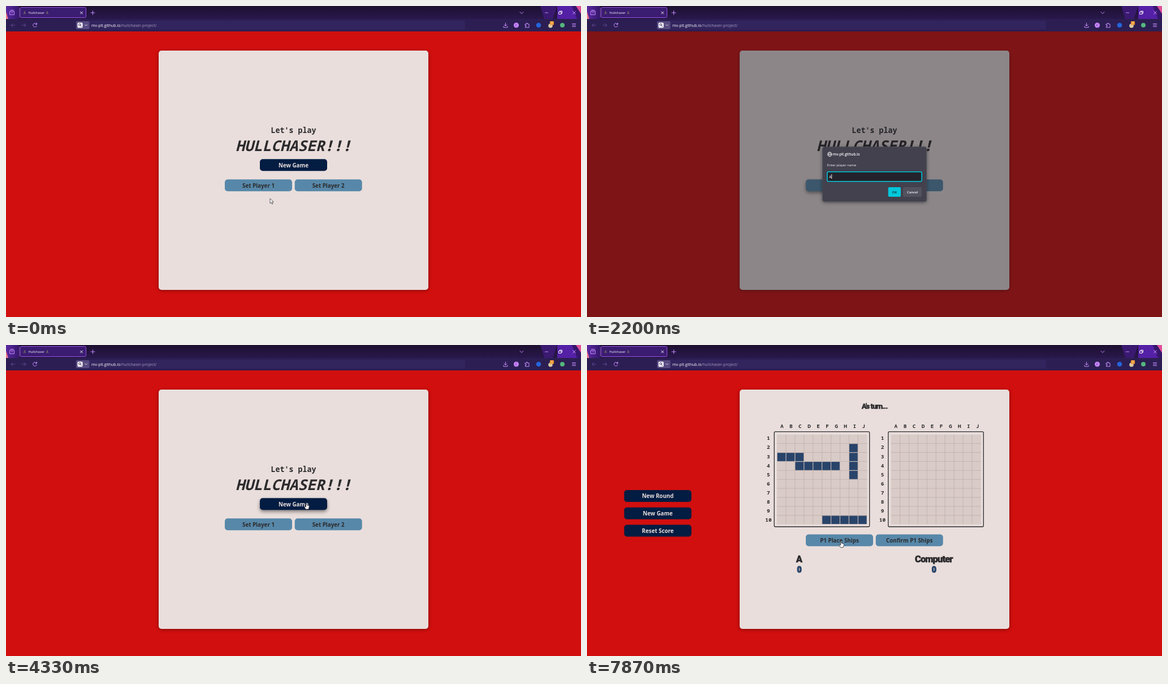
These frames come from a looping animation (1017 px wide and 551 px high, 8 s). An HTML page:

```html
<!DOCTYPE html>
<html lang="en">
<head>
<meta charset="utf-8">
<title>Hullchaser</title>
<style>
  html, body { margin: 0; width: 100%; height: 100%; overflow: hidden; background: #d10f0e; }
  svg { display: block; width: 100vw; height: 100vh; }
  text { font-family: 'Open Sans', 'Noto Sans', sans-serif; fill: #fbfbfe; white-space: pre; }
  .mid { text-anchor: middle; }
  .mono { font-family: 'Noto Sans Mono', 'DejaVu Sans Mono', monospace; font-weight: 700; fill: #2b2a2c; }
  .heavy { font-family: Impact, Roboto, sans-serif; font-weight: 900; fill: #2b2a2c; letter-spacing: -.9px; }
  .label { font: 700 9.8px 'Noto Sans', sans-serif; text-anchor: middle; }
  .line { fill: none; stroke: #c58cff; stroke-width: 1; stroke-linecap: round; stroke-linejoin: round; }
</style>
</head>
<body>
<svg id="stage" viewBox="0 0 1017 551" preserveAspectRatio="none"></svg>
<script>
const rect = (x, y, w, h, fill, r = 0, more = '') =>
  `<rect x="${x}" y="${y}" width="${w}" height="${h}" rx="${r}" fill="${fill}" ${more}/>`;
const text = (x, y, size, str, cls = '', more = '') =>
  `<text x="${x}" y="${y}" class="${cls}" style="font-size:${size}px;${more}">${str}</text>`;
const line = (d, more = '') => `<path class="line" d="${d}" ${more}/>`;
const group = (id, body) => `<g id="${id}">${body}</g>`;

function button(x, y, label, navy, id) {
  const shadow = id ? rect(x, y + 3, 119, 21, '#000', 5, `id="${id}" filter="url(#soft)"`) : '';
  return shadow + rect(x, y, 119, 21, navy ? '#031c42' : '#5788a9', 5) +
    `<text class="label" x="${x + 59.5}" y="${y + 14.2}" style="fill:${navy ? '#e9dedc' : '#2b2a2c'}">${label}</text>`;
}

function board(x) {
  let out = rect(x, 153.7, 168.5, 168.3, 'none', 2, 'stroke="#2b2a2c" stroke-width="1.3"') +
    rect(x + 4.8, 158.6, 159.4, 159.2, '#d9cbc7');
  let grid = '';
  for (let i = 0; i < 10; i++) {
    out += text(x + 13.6 + i * 16.05, 147.4, 9.4, 'ABCDEFGHIJ'[i], 'mono mid') +
      text(x - 10.3, 168.4 + i * 16.05, 9.4, i + 1, 'mono mid');
    if (i) grid += `M${x + 4.8 + i * 15.93} 158.6v159.2M${x + 4.8} ${158.6 + i * 15.91}h159.4`;
  }
  return out + `<path d="${grid}" stroke="#c1b3af" stroke-width=".9"/>`;
}

// Each ship: column, row, length, vertical
const fleet = (id, ships) => group(id, ships.map(([col, row, len, down]) =>
  Array.from({ length: len }, (_, i) => rect(336.5 + (col + (down ? 0 : i)) * 15.93,
    159.3 + (row + (down ? i : 0)) * 15.91, 14.8, 14.7, '#29446a')).join('')).join(''));

const score = (x, name) => text(x, 385.4, 16.5, name, 'heavy mid', 'stroke:#2b2a2c;stroke-width:.5px') +
  text(x, 403, 14, '0', 'heavy mid', 'fill:#2f5c8f;stroke:#172b49;stroke-width:1px');

const chrome =
  rect(0, 0, 1017, 24, 'url(#bar)') + rect(0, 23, 1017, 22, '#2c1e52') +
  rect(0, 0, 23, 23, 'url(#corner)') + '<path d="M0 10L4 23H0z" fill="#f2788c"/>' +
  '<path d="M945 0h30l-8 23h-15z" fill="#3a1a70"/><path d="M975 0h26l10 23h-36z" fill="#5420a5"/>' +
  '<path d="M1001 0h16v23h-7z" fill="#35166c"/><path d="M1008 0h9v14z" fill="#e0519a"/>' +
  line('M7 9.5h7.5v6h-7.5zM8 7.5h5.5M9.5 12h2.5') + line('M23.5 3v17', 'opacity=".4"') +
  rect(25, 2.5, 116.5, 18, '#3a1c70', 2, 'stroke="#9a50df"') +
  text(30, 14.4, 6.5, '⚓', '', 'font-family:DejaVu Sans,sans-serif;fill:#a8a860') +
  text(39.5, 14.2, 5.8, 'Hullchaser') +
  text(70, 14.4, 6.5, '⚓', '', 'font-family:DejaVu Sans,sans-serif;fill:#a8a860') +
  line('M131.5 10l4 4m0-4l-4 4', 'style="stroke:#eee"') + line('M150 12h7m-3.5-3.5v7') +
  line('M909 10.5l3 3 3-3M953.5 12h5M1002.5 9.5l5 5m0-5l-5 5') +
  line('M978 10.5h4v4h-4zM979.5 10.5v-1.5h4v4h-1.5', 'style="stroke:#eee"') +
  line('M16 34h-7m3-3l-3 3 3 3M28 34h7m-3-3l3 3-3 3', 'opacity=".35"') +
  line('M54 32a3.4 3.4 0 1 0 .4 3M54.5 30v2.5h-2.5') +
  rect(123, 26, 689, 16, '#32245d', 2) + rect(124, 27, 23.5, 14, '#574a80', 2) +
  rect(126.5, 29.5, 9, 9, '#fff', 1.5) +
  line('M133.5 36.5l-1.7-1.7M132.3 33.2a1.8 1.8 0 1 1-3.6 0 1.8 1.8 0 1 1 3.6 0', 'style="stroke:#35205f"') +
  line('M139.5 33l2 2 2-2', 'style="stroke:#ddd"') +
  text(151, 36.7, 7, 'mv-plt.github.io<tspan fill="#a59bbd">/hullchaser-project/</tspan>') +
  line('M883.5 30v5m-2.5-2l2.5 2.5 2.5-2.5M880 36v2h7v-2') +
  '<circle cx="902.5" cy="34" r="4.5" fill="#c985ff"/>' + text(902.5, 36, 5.5, 'C', 'mid', 'fill:#35205f') +
  line('M918.5 32h2v-1.5h2v1.5h2.5v6h-6.5v-2h1.5v-2h-1.5z') +
  '<circle cx="942" cy="34" r="4.3" fill="#2464dc"/><circle cx="963" cy="35" r="3.8" fill="#d9c9a4"/>' +
  rect(962, 27, 7, 6.5, '#f09a35', 1) + text(965.5, 32.3, 5, '1', 'mid') +
  '<circle cx="984" cy="34" r="4" fill="#54b77d"/>' + line('M1001.5 31.5h6m-6 2.5h6m-6 2.5h6');

const startScreen =
  text(508.5, 225, 13.3, "Let's play", 'mono mid') +
  text(508.5, 256.5, 26.2, 'HULLCHASER!!!', 'mono mid', 'font-style:italic') +
  button(449, 271.3, 'New Game', true, 'newShade') +
  button(387, 307.3, 'Set Player 1', false, 'oneShade') +
  button(510.7, 307.3, 'Set Player 2', false, 'twoShade');

const gameScreen =
  text(508.5, 113.4, 13, "A's turn...", 'heavy mid', 'stroke:#2b2a2c;stroke-width:.4px') +
  board(331.2) + board(532.8) + score(375, 'A') + score(613.3, 'Computer') +
  ['New Round', 'New Game', 'Reset Score'].map((s, i) => button(65.7, 257.1 + i * 30.7, s, true)).join('') +
  group('single', button(449, 335.5, 'P1 Place Ships', false, 'placeShade')) +
  group('pair', button(387, 335.5, 'P1 Place Ships', false, 'againShade') +
    button(510.7, 335.5, 'Confirm P1 Ships', false, 'confirmShade')) +
  fleet('fleetA', [[1, 0, 5], [8, 2, 4, 1], [0, 5, 3], [4, 7, 3], [2, 8, 2, 1]]) +
  fleet('fleetB', [[0, 2, 3], [2, 3, 5], [8, 1, 4, 1], [5, 9, 3], [8, 9, 2]]);

const prompt =
  rect(0, 45, 1017, 506, '#1c1b22', 0, 'opacity=".45"') +
  rect(416.5, 251, 184, 97, '#000', 4, 'opacity=".5" filter="url(#soft)"') +
  rect(416.5, 249.5, 184, 97, '#42414d', 3.5, 'stroke="#55545f" stroke-width=".6"') +
  line('M433 262.7a3.7 3.7 0 1 1-7.4 0 3.7 3.7 0 1 1 7.4 0zM425.6 262.7h7.4M429.3 259c-2.4 2-2.4 5.4 0 7.4c2.4-2 2.4-5.4 0-7.4', 'style="stroke:#fbfbfe;stroke-width:.8"') +
  text(435, 265, 6.2, 'mv-plt.github.io', '', 'font-weight:600') +
  text(424.8, 283.5, 6, 'Enter player name') +
  rect(425, 293.7, 167, 17, '#23222b', 2, 'id="field"') +
  text(428.3, 304.5, 6.2, 'A', '', '').replace('<text', '<text id="typed"') +
  rect(428.4, 298, .9, 8, '#fbfbfe', 0, 'id="caret"') +
  rect(532.7, 321, 22.3, 17, '#00c8dc', 2, 'id="ok"') + text(543.8, 332, 6, 'OK', 'mid', 'fill:#23222b;font-weight:600') +
  rect(559, 321, 33, 17, '#52515e', 2) + text(575.5, 332, 6, 'Cancel', 'mid', 'font-weight:600');

const pointers = group('pointer',
  '<path id="arrow" d="M0 0V8.6L2.1 6.8 3.5 10 5 9.3 3.6 6.2H6.2z" fill="#fff" stroke="#222" stroke-width=".7"/>' +
  '<path id="hand" d="M-.8 .6Q0-.6 .8 .6V4.2L4 5Q5.2 5.3 5 6.6L4.4 9.4 3.6 11.7H-1.2L-3.6 7.3Q-3.8 6-2.4 6.4L-.8 8z" fill="#fff" stroke="#222" stroke-width=".8"/>' +
  '<path id="beam" d="M-2-6.5h1.4q.6 0 .6 .6V5.9q0 .6-.6 .6H-2M2-6.5H.6Q0-6.5 0-5.9V5.9q0 .6 .6 .6H2" fill="none" stroke="#ddd" stroke-width=".8"/>');

const stage = document.getElementById('stage');
stage.innerHTML = `<defs>
  <filter id="soft" x="-20%" y="-80%" width="140%" height="260%"><feGaussianBlur stdDeviation="3"/></filter>
  <linearGradient id="bar" x2="0" y2="1"><stop stop-color="#1d1030"/><stop offset="1" stop-color="#29184d"/></linearGradient>
  <linearGradient id="corner"><stop stop-color="#5c2aa2"/><stop offset="1" stop-color="#34166a"/></linearGradient>
  </defs>` + rect(0, 0, 1017, 551, '#d10f0e') + chrome +
  rect(270, 81, 477, 423, '#000', 5, 'opacity=".4" filter="url(#soft)"') +
  rect(270, 79, 477, 424, '#e9dedc', 5) +
  group('start', startScreen) + group('game', gameScreen) + group('prompt', prompt) + pointers;

const el = Object.fromEntries([...stage.querySelectorAll('[id]')].map(e => [e.id, e]));
const show = (id, on) => el[id].setAttribute('visibility', on ? 'inherit' : 'hidden');
const clamp = v => Math.max(0, Math.min(1, v));

// Pointer path: time, x, y
const path = [
  [0, 467, 341], [800, 459.7, 318], [1130, 459.7, 318], [1470, 465.5, 299.7], [2800, 465.5, 299.7],
  [3330, 545.3, 329.3], [3530, 546.5, 330.3], [4200, 531.3, 279.3], [5460, 531.3, 279.3],
  [5870, 574, 240], [6330, 533, 350], [6600, 533, 350], [7400, 449.5, 347]
];

function pointerAt(t) {
  const i = path.findIndex(p => p[0] > t);
  if (i < 0) return path[path.length - 1].slice(1);
  const [t0, x0, y0] = path[i - 1], [t1, x1, y1] = path[i];
  let k = (t - t0) / (t1 - t0);
  k = k * k * (3 - 2 * k);
  return [x0 + (x1 - x0) * k, y0 + (y1 - y0) * k];
}

function draw(t) {
  const within = (a, b) => t >= a - 5 && t < b - 5;
  const shade = (id, on, off, fade = 270) =>
    el[id].setAttribute('opacity', .45 * (clamp((t - on) / 270) - clamp((t - off) / fade)));

  show('start', t < 4795);
  show('game', t >= 4795);
  show('prompt', within(930, 3530));
  show('single', within(4800, 6600));
  show('pair', t >= 6595);
  show('fleetA', within(6600, 7870));
  show('fleetB', t >= 7865);

  shade('oneShade', 470, 3530);
  shade('twoShade', 3590, 3800);
  shade('newShade', 4000, 4800);
  shade('placeShade', 6130, 6600);
  shade('confirmShade', 6600, 6870);
  shade('againShade', 7270, 7860, 1);

  const focused = t < 3465;
  el.field.setAttribute('stroke', focused ? '#00c8dc' : '#8f8f9d');
  el.field.setAttribute('stroke-width', focused ? 1.5 : .7);
  show('typed', within(2200, 3530));
  el.caret.setAttribute('x', t < 2195 ? 428.4 : 432.3);
  show('caret', within(930, 1430) || within(1930, 2730) || within(3230, 3470));

  const [x, y] = pointerAt(t);
  el.ok.setAttribute('fill', !focused ? '#a8e2e4' : x > 533 && y > 321 ? '#70d4df' : '#00c8dc');
  const beam = within(930, 3470) && y < 311;
  const hand = within(400, 930) || within(3530, 4870) || (t > 6000 && y > 335);
  el.pointer.setAttribute('transform', `translate(${x} ${y})`);
  show('beam', beam && !within(2200, 2870));
  show('hand', hand);
  show('arrow', !beam && !hand);
}

const step = 1000 / 15;
const begin = performance.now();
function tick() {
  const t = (performance.now() - begin) % 8000;
  draw(Math.floor((t + 5) / step) * step);
  requestAnimationFrame(tick);
}
tick();
</script>
</body>
</html>
```
